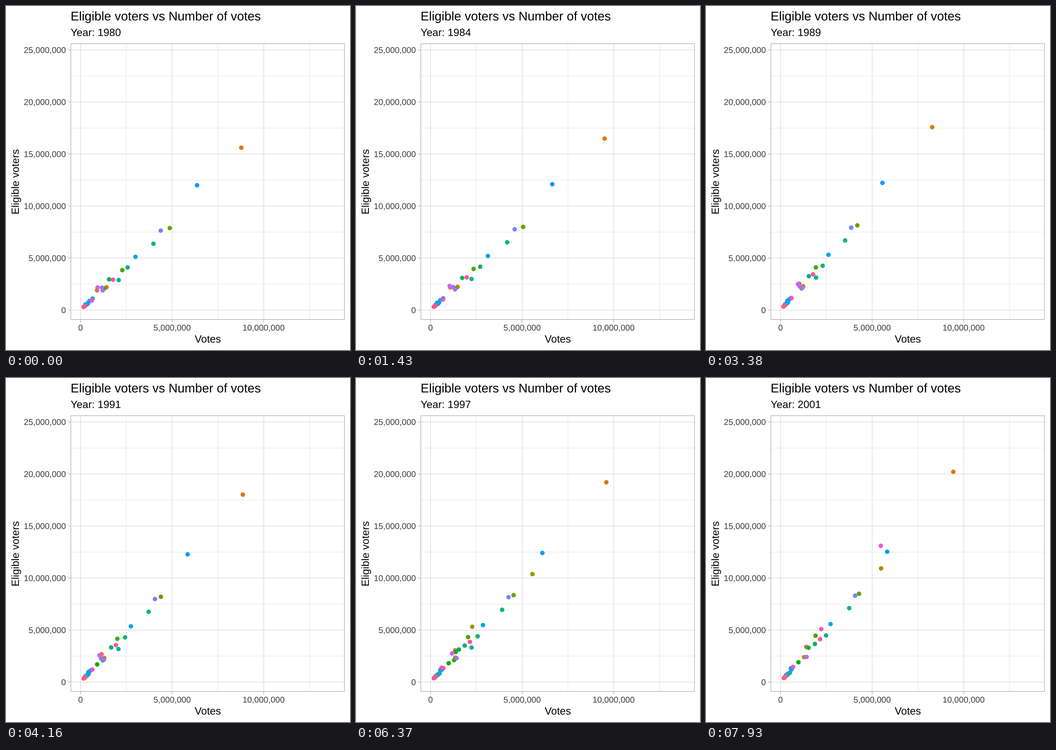
A matplotlib script for the animation above (8000 ms loop, 748 by 748 pixels).

```python
import numpy as np
import matplotlib.pyplot as plt
from matplotlib.animation import FuncAnimation
from matplotlib.patches import PathPatch, Rectangle
from matplotlib.textpath import TextPath
from matplotlib.transforms import Affine2D

SIZE, DPI = 748, 100
FRAMES, LOOP = 62, 8000
YEARS = np.arange(1980, 2003, 2)
RATE = 34 / 99                                   # years per frame
KEYS = np.round((YEARS - 1980) / RATE).astype(int)
LEFT, RIGHT, TOP, BOTTOM = 140.5, 736.5, 81.4, 682.1
GAMMA = 1.22
GRID, EDGE, LABEL = (str(g ** GAMMA) for g in (0.87, 0.70, 0.30))

# Turnout of each election relative to 1980; midterms run low
TURNOUT = np.array([1, .83, 1.03, .71, .99, .70, 1.06, .75, .945, .73, .98, .71])
TURNOUT_2001 = TURNOUT[-2:].mean()

# Hue step, then votes and eligible voters (millions) in 1980 and 2001,
# and the last election reported if the series stops early
STATES = [
    (2, .903, 1.90, 1.41, 3.385), (4, 8.775, 15.61, 9.44, 20.21),
    (6, 1.42, 2.20, 1.287, 2.40), (13, 4.87, 7.88, 4.29, 8.49),
    (14, 2.28, 3.84, 1.912, 4.463), (15, 1.29, 2.07, 1.24, 2.12, 1998),
    (20, 1.563, 2.96, 1.882, 3.668), (21, 2.57, 4.10, 2.484, 4.485),
    (22, 3.98, 6.38, 3.754, 7.11), (23, 2.083, 2.885, 2.2, 3.45, 1998),
    (27, .66, 1.11, .60, 1.23), (28, .27, .56, .577, 1.34),
    (29, .40, .65, .514, .897), (30, 3.0, 5.12, 2.73, 5.58),
    (31, .477, .87, .57, 1.25), (32, 6.36, 12.0, 5.827, 12.53),
    (35, 4.38, 7.64, 4.078, 8.308), (36, 1.174, 2.157, 1.14, 2.42, 1994),
    (37, 1.21, 1.89, 1.43, 2.42), (40, .93, 2.18, 1.2, 2.92, 1998),
    (44, .615, .925, .685, 1.463), (47, 1.777, 2.92, 2.166, 4.13),
]

# Hue step, votes and eligible voters in 2001, first and last election reported
JOINERS = [
    (5, 1.5, 3.0, 1992, 1994), (9, 5.5, 10.93, 1992, 2002),
    (10, 2.25, 5.6, 1996, 1998), (16, .979, 1.913, 1990, 2002),
    (17, 1.36, 3.05, 1996, 1998), (18, 1.53, 3.3, 1992, 2002),
    (24, .76, 2.1, 1992, 1994), (43, 5.483, 13.1, 2000, 2002),
    (46, 2.228, 5.095, 2000, 2002), (48, .60, 1.46, 1996, 1998),
]
SMALL = (8, 11, 12, 26, 34, 41, 45, 50)


def px(v):
    return 162 + 39.85 * v


def py(v):
    return 661.3 - 22.628 * v


def hue_color(i):
    """Equally spaced hue at luminance 65 and chroma 100."""
    h = np.radians(15 + 360 / 51 * i)
    lum = 65
    u = 100 * np.cos(h) / (13 * lum) + 0.1978
    v = 100 * np.sin(h) / (13 * lum) + 0.4683
    y = ((lum + 16) / 116) ** 3
    x = 9 * y * u / (4 * v)
    z = -x / 3 - 5 * y + 3 * y / v
    lin = np.array([3.2405 * x - 1.5372 * y - 0.4985 * z,
                    -0.9693 * x + 1.8760 * y + 0.0416 * z,
                    0.0556 * x - 0.2040 * y + 1.0573 * z]).clip(0, 1)
    rgb = np.where(lin > 0.00304, 1.055 * lin ** (1 / 2.4) - 0.055, 12.92 * lin)
    return tuple(rgb.clip(0, 1) ** GAMMA)


def series(hue, v0, e0, v1, e1, last=2002, first=1980):
    """Votes and eligible voters at every election, from the two end points."""
    t = (YEARS - 1980) / 21
    pool = e0 + (e1 - e0) * t
    share0, share1 = v0 / e0, v1 / e1 / TURNOUT_2001
    votes = pool * TURNOUT * (share0 + (share1 - share0) * t)
    votes[(YEARS < first) | (YEARS > last)] = np.nan
    return hue, votes, pool


def joiner(hue, v, e, first, last):
    grown = 1.3
    return series(hue, v / grown / TURNOUT_2001, e / grown, v, e, last, first)


def small_states():
    rng = np.random.default_rng(4)
    for hue, e in zip(SMALL, np.linspace(.65, .30, len(SMALL))):
        v = e * rng.uniform(.52, .65)
        yield series(hue, v, e, v * 1.1, e * 1.3)


points = [series(*s) for s in STATES] + [joiner(*j) for j in JOINERS]
points += small_states()
points.sort(key=lambda p: p[0])
HUES, VOTES, POOL = (np.array(c) for c in zip(*points))

fig = plt.figure(figsize=(SIZE / DPI, SIZE / DPI), dpi=DPI, facecolor="white")
ax = fig.add_axes([0, 0, 1, 1])
ax.set(xlim=(0, SIZE), ylim=(SIZE, 0))
ax.axis("off")


def glyphs(s, size):
    return TextPath((0, 0), s, size=size, prop={"family": "Liberation Sans"})


def text(s, x, y, size, align=0.0, color="black", rot=0):
    path = glyphs(s, size)
    box = path.get_extents()
    dx = align and box.x0 + align * box.width
    place = Affine2D().translate(-dx, 0).rotate_deg(rot).scale(1, -1).translate(x, y)
    patch = PathPatch(path, fc=color, lw=0, transform=place + ax.transData)
    ax.add_artist(patch)
    return patch


def line(xs, ys, width, color):
    ax.plot(xs, ys, color=color, lw=width * 72 / DPI, snap=False,
            solid_capstyle="butt", zorder=1)


for v in np.arange(2.5, 13, 5):
    line((px(v),) * 2, (TOP, BOTTOM), 0.6, GRID)
for v in np.arange(2.5, 25, 5):
    line((LEFT, RIGHT), (py(v),) * 2, 0.6, GRID)
for v in range(0, 11, 5):
    x = px(v)
    line((x, x), (TOP, BOTTOM), 1.11, GRID)
    line((x, x), (BOTTOM, BOTTOM + 5.7), 1.11, EDGE)
    text(f"{v * 10**6:,}", x, 705.8, 18.3, 0.5, LABEL)
for v in range(0, 26, 5):
    y = py(v)
    line((LEFT, RIGHT), (y, y), 1.11, GRID)
    line((LEFT - 5.7, LEFT), (y, y), 1.11, EDGE)
    text(f"{v * 10**6:,}", 129.5, y + 6.5, 18.3, 1, LABEL)

ax.add_patch(Rectangle((LEFT + .55, TOP + .55), RIGHT - LEFT - 1.1,
                       BOTTOM - TOP - 1.1, fill=False, ec=EDGE,
                       lw=1.11 * 72 / DPI, snap=False, zorder=4))

BODY = 22.8
text("Eligible voters vs Number of votes", LEFT, 31.4, BODY * 1.2)
subtitle = text("Year: 1980", LEFT, 65.2, BODY)
text("Votes", (LEFT + RIGHT) / 2, 731.8, BODY, 0.5)
text("Eligible voters", 28, (TOP + BOTTOM) / 2, BODY, 0.5, rot=90)

dots = ax.scatter(np.zeros(len(HUES)), np.zeros(len(HUES)),
                  s=(9.7 * 72 / DPI) ** 2, lw=0, zorder=3,
                  c=[hue_color(h) for h in HUES])


def quartic(t):
    return 8 * t ** 4 if t < 0.5 else 1 - 8 * (1 - t) ** 4


def blend(data, k, t):
    if t == 0:
        return data[:, k]
    return data[:, k] * (1 - t) + data[:, k + 1] * t


def draw(n):
    k = np.searchsorted(KEYS, n, side="right") - 1
    t = quartic((n - KEYS[k]) / (KEYS[k + 1] - KEYS[k]))
    dots.set_offsets(np.column_stack((px(blend(VOTES, k, t)),
                                      py(blend(POOL, k, t)))))
    subtitle.set_path(glyphs(f"Year: {round(1980 + n * RATE)}", BODY))
    return dots, subtitle


anim = FuncAnimation(fig, draw, frames=FRAMES, interval=LOOP / FRAMES,
                     repeat=True, repeat_delay=0, blit=False)
plt.show()
```
